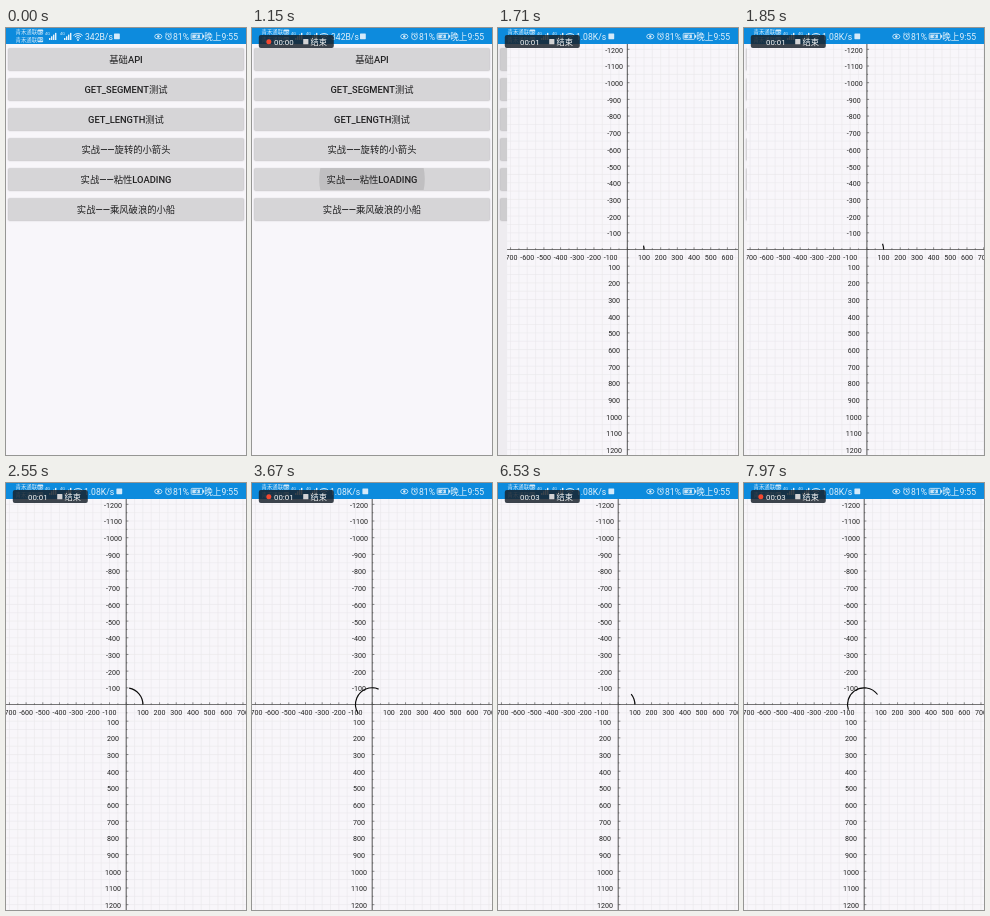
An HTML page with a canvas that plays this animation: 240 px wide and 427 px high, repeating every 7.99 s.

```html
<!DOCTYPE html>
<html lang="zh">
<head>
<meta charset="utf-8">
<style>
html, body { margin: 0; width: 100%; height: 100%; overflow: hidden; background: #f8f6fa; }
canvas { display: block; width: 240px; height: 427px; }
</style>
</head>
<body>
<canvas id="stage"></canvas>
<script>
const W = 240, H = 427, LOOP = 7990, BAR = 16;
const UI = 'Roboto, "Noto Sans CJK SC", "Noto Sans CJK", sans-serif';
const PAPER = '#f8f6fa', BLUE = '#0d8bdd';
const LABELS = ['基础API', 'GET_SEGMENT测试', 'GET_LENGTH测试',
  '实战——旋转的小箭头', '实战——粘性LOADING', '实战——乘风破浪的小船'];

const canvas = document.getElementById('stage');
const ctx = canvas.getContext('2d');
const dpr = window.devicePixelRatio || 1;
canvas.width = Math.round(W * dpr);
canvas.height = Math.round(H * dpr);

const BEAT = 165.8, BEAT0 = 1548;
const beatAt = n => 10 + 20 * Math.round((BEAT0 + BEAT * n - 10) / 20);

function stutter(t) {
  let n = Math.floor((t - BEAT0) / BEAT) + 1;
  while (beatAt(n) > t) n--;
  const start = beatAt(n);
  const steps = (beatAt(n + 1) - start - 100) / 20 + 1;
  const k = t < start + 100 ? 0 : 1 + Math.floor((t - start - 100) / 20);
  return BEAT0 + BEAT * (n + k / steps);
}

const clamp = x => Math.max(0, Math.min(1, x));

function rect(x, y, w, h, color) {
  ctx.fillStyle = color;
  ctx.fillRect(x, y, w, h);
}

function disc(x, y, r, color) {
  ctx.fillStyle = color;
  ctx.beginPath();
  ctx.arc(x, y, r, 0, 7);
  ctx.fill();
}

function box(x, y, w, h, r, color) {
  ctx.fillStyle = color;
  ctx.beginPath();
  ctx.roundRect(x, y, w, h, r);
  ctx.fill();
}

function line(x1, y1, x2, y2, color, width) {
  ctx.strokeStyle = color;
  ctx.lineWidth = width;
  ctx.beginPath();
  ctx.moveTo(x1, y1);
  ctx.lineTo(x2, y2);
  ctx.stroke();
}

function text(s, x, y, size, color, align = 'left', weight = 400) {
  ctx.font = `${weight} ${size}px ${UI}`;
  ctx.fillStyle = color;
  ctx.textAlign = align;
  ctx.textBaseline = 'alphabetic';
  ctx.fillText(s, x, y);
}

function drawMenu(v) {
  rect(0, 0, W, H, PAPER);
  LABELS.forEach((label, i) => {
    const y = 20 + 30 * i;
    ctx.save();
    ctx.shadowColor = 'rgba(0,0,0,.3)';
    ctx.shadowBlur = 1.6 * dpr;
    ctx.shadowOffsetY = 0.6 * dpr;
    box(2.3, y + 0.2, 235.4, 21.8, 0.8, '#d6d5d7');
    ctx.restore();
    if (i === 4) drawRipple(y, v);
    text(label, 120, y + 14.6, 9.33, '#212122', 'center', 500);
  });
}

function drawRipple(y, v) {
  const grow = clamp((v - 960) / 300);
  if (!grow) return;
  ctx.save();
  ctx.beginPath();
  ctx.rect(2.3, y, 235.4, 22);
  ctx.clip();
  const alpha = 0.1 * (1 - clamp((v - 1240) / 180));
  disc(120, y + 11, 120 * grow, `rgba(0,0,0,${alpha})`);
  ctx.restore();
}

const CX = 120.2, CY = 221.5, UNIT = 16.68;

function drawAxes() {
  rect(0, 0, W, H, PAPER);
  for (let i = -25; i <= 25; i++) {
    const d = i * UNIT / 2;
    line(CX + d, BAR, CX + d, H, '#e9e7eb', 0.6);
    line(0, CY + d, W, CY + d, '#e9e7eb', 0.6);
  }
  line(0, CY, W, CY, '#555', 0.8);
  line(CX, BAR, CX, H, '#444', 0.9);
  for (let i = -25; i <= 25; i++) {
    const d = i * UNIT / 2, len = i % 2 ? 1.2 : 2.2;
    line(CX + d, CY, CX + d, CY - len, '#444', 0.6);
    line(CX, CY + d, CX + len, CY + d, '#444', 0.6);
  }
  for (let i = -12; i <= 12; i++) {
    if (!i) continue;
    text(i * 100, 107, CY + i * UNIT + 3.4, 7.1, '#222', 'center');
    if (Math.abs(i) <= 7) text(i * 100, CX + i * UNIT, 231.8, 7.1, '#222', 'center');
  }
}

// The head runs once round with ease in and out; the tail leaves at half way.
function drawArc(v) {
  const u = (v - 1165) / 4415;
  if (u < 0) return;
  const p = 0.5 - Math.cos(Math.PI * (u % 1)) / 2;
  const tail = p - (0.5 - Math.abs(p - 0.5));
  ctx.strokeStyle = '#0a0a0a';
  ctx.lineWidth = 1.15;
  ctx.beginPath();
  ctx.arc(CX, CY, UNIT, -tail * 2 * Math.PI, -p * 2 * Math.PI, true);
  ctx.stroke();
}

function signal(x) {
  text('4G', x, 7.2, 4, '#d8ecfa');
  for (let i = 0; i < 4; i++) {
    const h = 2 + i * 1.7;
    rect(x + 4 + i * 2, 12 - h, 1.4, h, '#e6f3fc');
  }
}

function wifi(x, y) {
  ctx.strokeStyle = '#e6f3fc';
  ctx.lineWidth = 1;
  for (const r of [2.4, 4.4, 6.4]) {
    ctx.beginPath();
    ctx.arc(x, y, r, -Math.PI * 0.75, -Math.PI * 0.25);
    ctx.stroke();
  }
  disc(x, y, 0.9, '#e6f3fc');
}

function drawStatus(t) {
  const pale = '#e2f1fb', later = t >= 1630;
  rect(0, 0, W, BAR, BLUE);
  for (const y of [6.2, 14]) {
    text('青禾通联', 9.5, y, 5.4, '#cfe7f8');
    box(31.5, y - 4.8, 5.6, 5, 0.8, '#cfe7f8');
    text('HD', 34.3, y - 0.7, 3.6, BLUE, 'center', 700);
  }
  signal(39);
  signal(54);
  wifi(72, 12);
  text(later ? '1.08K/s' : '342B/s', later ? 78 : 79, 11.6, 8.6, pale);
  box(later ? 110.4 : 108, 5.4, 5.8, 5.8, 0.6, '#d4eafa');

  ctx.strokeStyle = pale;
  ctx.lineWidth = 0.8;
  ctx.beginPath();
  ctx.ellipse(152.3, 8.5, 3.6, 2.4, 0, 0, 7);
  ctx.stroke();
  disc(152.3, 8.5, 1.2, pale);
  ctx.beginPath();
  ctx.arc(162.5, 8.7, 2.9, 0, 7);
  ctx.moveTo(162.5, 6.9);
  ctx.lineTo(162.5, 8.9);
  ctx.lineTo(164, 8.9);
  ctx.moveTo(159.1, 6.3);
  ctx.lineTo(160.8, 4.8);
  ctx.moveTo(165.9, 6.3);
  ctx.lineTo(164.2, 4.8);
  ctx.stroke();

  text('81%', 167, 11.6, 8.6, pale);
  ctx.strokeStyle = pale;
  ctx.beginPath();
  ctx.roundRect(185.2, 5.4, 11.4, 6, 1);
  ctx.stroke();
  rect(197, 7.2, 1.2, 2.4, pale);
  rect(186.3, 6.5, 7.6, 3.8, '#c8e4f7');
  line(192, 6.4, 189.6, 8.6, BLUE, 0.8);
  line(189.6, 8.6, 191.8, 8.6, BLUE, 0.8);
  line(191.8, 8.6, 189.4, 10.6, BLUE, 0.8);
  text('晚上9:55', 232, 11.6, 8.6, pale, 'right');
}

// Half seconds of the screen recorder's clock.
const TICKS = [660, 1350, 2670, 3774, 4878, 5982, 7086];

function drawRecorder(t) {
  if (t < 230) return;
  const half = TICKS.filter(at => t >= at).length;
  ctx.globalAlpha = t < 320 ? 0.6 : 1;
  box(6.8, 7, 75, 13, 2, 'rgba(24,34,44,.84)');
  if (half % 2) disc(16.8, 13.7, 2.5, '#f4472f');
  text('00:0' + (half >> 1), 22, 16.7, 7.9, '#f4f6f7');
  box(51.2, 11, 5.2, 5.2, 0.5, '#d3d3d5');
  text('结束', 58.5, 16.8, 8.2, '#f4f6f7');
  ctx.globalAlpha = 1;
}

function draw(t) {
  const v = stutter(t);
  const shift = 46.3 * Math.exp((BEAT0 - v) / 102);
  const fade = t < 1510 ? 0 : clamp(0.8 + (v - BEAT0) / 156);
  ctx.setTransform(dpr, 0, 0, dpr, 0, 0);

  if (fade < 1 || shift > 0.3) {
    drawMenu(v);
    rect(0, 0, W, H, `rgba(0,0,0,${0.04 * fade * clamp(shift / 9)})`);
  }
  if (fade > 0) {
    const dx = shift > 0.3 ? shift : 0;
    ctx.save();
    ctx.translate(dx, 0);
    ctx.beginPath();
    ctx.rect(0, 0, W, H);
    ctx.clip();
    if (fade < 1) drawFaded(fade, v);
    else {
      drawAxes();
      drawArc(v);
    }
    ctx.restore();
  }
  drawStatus(t);
  drawRecorder(t);
}

// Veil the menu first, then lay the lines over it at the same strength.
function drawFaded(fade, v) {
  ctx.globalAlpha = fade;
  rect(0, 0, W, H, PAPER);
  ctx.globalCompositeOperation = 'multiply';
  drawAxes();
  drawArc(v);
  ctx.globalCompositeOperation = 'source-over';
  ctx.globalAlpha = 1;
}

function tick() {
  draw(performance.now() % LOOP);
  requestAnimationFrame(tick);
}
tick();
</script>
</body>
</html>
```
